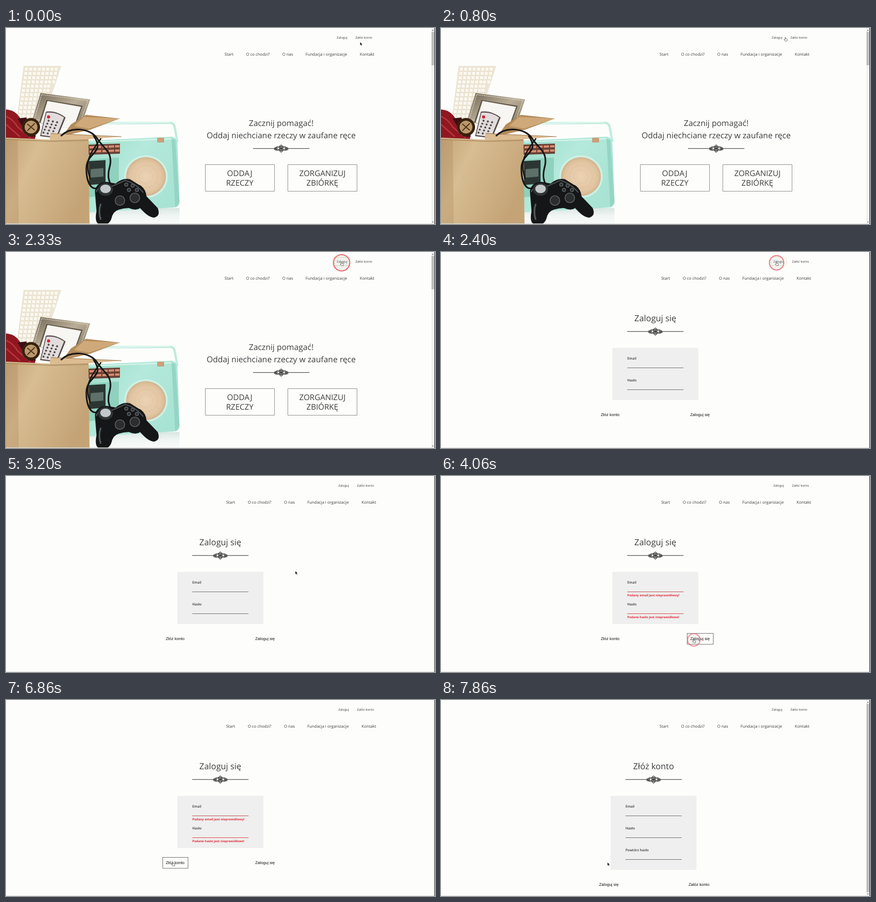
These frames come from a looping animation (806x368 px, 8 s). An HTML page:

```html
<!DOCTYPE html>
<html lang="pl">
<head>
<meta charset="utf-8">
<title>Oddaj rzeczy</title>
<style>
html, body { margin: 0; width: 100%; height: 100%; overflow: hidden; background: #fdfefc; }
svg { display: block; width: 806px; height: 368px; }
text { font-family: "Open Sans", sans-serif; fill: #3c3c3c; text-rendering: geometricPrecision; }
.btn { font-family: "Liberation Sans", Arial, sans-serif; fill: #111; }
.mid { text-anchor: middle; }
.label { font-weight: 600; fill: #333; }
.error { font-weight: 700; fill: #e0303f; }
</style>
</head>
<body>
<svg viewBox="0 0 806 368">
  <defs>
    <linearGradient id="card" x2="1" y2="0.5">
      <stop offset="0" stop-color="#c3a478"/><stop offset=".35" stop-color="#d8bd92"/><stop offset="1" stop-color="#c4a477"/>
    </linearGradient>
    <linearGradient id="mint" x2="1" y2=".6">
      <stop offset="0" stop-color="#9cdcca"/><stop offset=".5" stop-color="#b4e9db"/><stop offset="1" stop-color="#a9e3d3"/>
    </linearGradient>
    <linearGradient id="floor" x2="0" y2="1">
      <stop offset="0" stop-color="#d9e6e2"/><stop offset=".5" stop-color="#f1f6f4"/><stop offset="1" stop-color="#f8faf9"/>
    </linearGradient>
    <linearGradient id="silver" x2="1" y2="1">
      <stop offset="0" stop-color="#6e6453"/><stop offset=".5" stop-color="#b9ad97"/><stop offset="1" stop-color="#7d715b"/>
    </linearGradient>
    <radialGradient id="cone">
      <stop offset="0" stop-color="#ecd2b3"/><stop offset=".8" stop-color="#e2c5a2"/><stop offset="1" stop-color="#d2b38c"/>
    </radialGradient>
    <g id="curl" fill="none" stroke="#333" stroke-width="1.100">
      <path d="M0-7L4-3.500L0-.5M0 7L4 3.200L0 .4M1-3.500h1.400M1 3.400h1.600M53 0H9"/>
      <path d="M3 0C5-5 10-4 8.500-1.200C7.500 0 5.800-1.500 7-2.200M3 0C5 5 10 4 8.500 1.200C7.500 0 5.800 1.500 7 2.200"/>
      <path d="M8 2C11 4 14 1.500 12.500 .2M8-2C11-3 13-1.500 12 0"/>
      <path d="M0-5L2-3.500L0-2ZM0 5L2 3.500L0 2ZM0-1.500L4 0L0 1.500ZM9-1.500L13 .5L9 2.500Z" fill="#333" stroke="none"/>
    </g>
    <g id="ornament"><use href="#curl"/><use href="#curl" transform="scale(-1 1)"/></g>
  </defs>
  <rect width="806" height="368" fill="#fdfefc"/>

  <g id="landing">
    <g id="photo">
      <path d="M33 71H104L84 132L66 172H20Z" fill="#eee6d5"/>
      <g id="keys" fill="#fbf8f0" stroke="#dcd1bb" stroke-width=".5"/>
      <path d="M65 122L158 134L140 186L48 176Z" fill="url(#silver)"/>
      <path d="M67 125L154 136L138 180L53 172Z" fill="none" stroke="#e0d7c4" stroke-width="1.500" stroke-dasharray="2 1.500"/>
      <path d="M76 135L144 146L128 190L62 178Z" fill="#62584a"/>
      <path d="M78 137L141 148L126 190L65 178Z" fill="#f8f6f2"/>
      <path d="M157 338H326V368H157Z" fill="url(#floor)"/>
      <path d="M160 186Q168 179 180 179L308 178Q315 178 317 186L322 214" fill="none" stroke="#c2ecdf" stroke-width="4.500"/>
      <path d="M170 180L308 176.500" stroke="#e6f7f2" stroke-width="2"/>
      <path d="M150 212L312 204Q321 206 322 216L326 326Q326 336 316 337L157 346Z" fill="url(#mint)"/>
      <path d="M318 210L326 328L318 337L311 208Z" fill="#94d5c3"/>
      <path d="M157 214L310 208" stroke="#d9f5ec" stroke-width="2"/>
      <path d="M284 206h13v9h-13Z" fill="#c99f7a"/>
      <path d="M155 219L214 217V236L155 238Z" fill="#6b4136"/>
      <path d="M157 224L213 222M157 232L213 230" stroke="#d98d72" stroke-width="4" stroke-dasharray="10 2"/>
      <path d="M155 247L212 243V312L155 318Z" fill="#8fd1be"/>
      <path d="M155 250L187 248V292L155 295Z" fill="#2b3633"/>
      <path d="M159 265L183 263V279L159 281Z" fill="#5d7069"/>
      <ellipse cx="263" cy="279" rx="41" ry="40" fill="#cdf1e6"/>
      <ellipse cx="263" cy="279" rx="37.500" ry="36.500" fill="url(#cone)"/>
      <g fill="none" stroke="#d3b48e" stroke-width="1" stroke-dasharray="1 2">
        <circle cx="263" cy="279" r="29"/><circle cx="263" cy="279" r="21"/><circle cx="263" cy="279" r="13"/>
      </g>
      <path d="M122 181L150 163L214 170L158 191L106 203Z" fill="#b48c5c"/>
      <path d="M146 167L214 170L156 189L128 184Z" fill="#cfa97a"/>
      <path d="M0 153Q18 154 27 170L56 198L54 212H0Z" fill="#8f1720"/>
      <path d="M0 166Q14 172 22 186L46 206M0 181L26 204" fill="none" stroke="#b9343d" stroke-width="2.500"/>
      <path d="M22 170L38 168L56 204H42Z" fill="#3a1013"/>
      <circle cx="47" cy="186" r="17" fill="#38210f"/>
      <circle cx="47" cy="186" r="12" fill="#bb996c"/>
      <path d="M40 193L54 179M40 180L54 192" stroke="#55371c" stroke-width="2"/>
      <path d="M75 157Q94 154 112 168L96 207L64 203Z" fill="#55484a"/>
      <path d="M76 159Q94 157 109 168L94 205L66 201Z" fill="#e2dcdc"/>
      <g id="pads" fill="#514b50"/>
      <circle cx="80" cy="167" r="3" fill="#cf2733"/>
      <path d="M0 207L82 211L155 209L157 368H0Z" fill="url(#card)"/>
      <path d="M0 207L22 209L24 368H0Z" fill="#a88659" opacity=".3"/>
      <path d="M0 205L85 210L155 207V212L85 214L0 210Z" fill="#9d784b" opacity=".45"/>
      <path d="M84 198L217 204L154 209L82 210Z" fill="#dcbc90"/>
      <path d="M84 198L217 204" stroke="#9b774b" stroke-width="1"/>
      <path d="M0 207L84 210" stroke="#e6cba3" stroke-width="1.500"/>
      <g fill="none" stroke="#161616" stroke-width="3" stroke-linecap="round">
        <path d="M104 202C122 184 158 188 171 207C184 228 203 232 194 264Q190 280 196 292"/>
        <path d="M165 203C187 236 151 232 151 264C151 294 163 308 176 298"/>
        <path d="M178 208C160 232 146 250 158 282" stroke-width="2.500"/>
      </g>
      <path d="M167 306Q171 288 190 289L206 292Q219 281 233 284L249 294Q262 299 264 316L285 338Q291 352 279 356Q267 356 252 338Q244 344 231 338Q222 338 212 341Q201 344 198 358Q195 368 186 368H174Q166 364 170 344Z" fill="#151617"/>
      <path d="M169 308Q178 291 200 297L224 286Q243 291 258 309" fill="none" stroke="#4d5153" stroke-width="2"/>
      <ellipse cx="187" cy="303" rx="14" ry="12" fill="#303435"/>
      <ellipse cx="187" cy="302" rx="10" ry="8" fill="#c3c8c8"/>
      <path d="M178 330Q173 345 178 360" fill="none" stroke="#565a5c" stroke-width="3"/>
      <g fill="#2b2e30" stroke="#5c6163" stroke-width="1.500">
        <circle cx="214" cy="324" r="9"/><circle cx="242" cy="319" r="9"/>
        <circle cx="226" cy="294" r="3"/><circle cx="238" cy="296" r="3"/><circle cx="231" cy="304" r="3"/><circle cx="246" cy="304" r="3"/>
      </g>
    </g>
    <use href="#ornament" x="517" y="226.300"/>
    <path d="M374.500 256.500h130v50h-130ZM529.500 256.500h130v50h-130Z" fill="none" stroke="#959595"/>
  </g>

  <g id="login"></g>
  <g id="register"></g>
  <g id="header"></g>
  <rect id="hover" fill="none"/>

  <g id="scroll">
    <path d="M799 0h6v368h-6Z" fill="#f1f1f1"/>
    <path d="M800.500 5l1.500-2 1.500 2ZM800.500 363.500l1.500 2 1.500-2Z" fill="#555"/>
    <rect id="thumb" x="799.500" y="7" width="5" fill="#bcbcbc"/>
  </g>
  <path d="M0 367.500H805" stroke="#e3e4e2"/>
  <path d="M805.500 0V368" stroke="#222"/>

  <circle id="ring" fill="#999" fill-opacity=".12" stroke="#e8696f" stroke-width="2"/>
  <g id="cursor">
    <path id="arrow" transform="translate(-.7 .4) scale(.88)" d="M0 0V7L1.700 5.500L2.900 8.200L4 7.700L2.800 5H5Z" fill="#111" stroke="#fff" stroke-width=".3"/>
    <path id="hand" transform="scale(.88)" d="M-.8 .6Q0-.5 .9 .6V3.200L3.600 3.800Q4.400 4 4.200 5.200L3.600 8H-.6L-2.800 5.200Q-3 4-.8 5Z" fill="#fff" stroke="#444" stroke-width=".8"/>
    <path id="beam" d="M-1.200-3.500h2.400M0-3.500v7M-1.200 3.500h2.400" fill="none" stroke="#777" stroke-width=".8"/>
  </g>
</svg>
<script>
const $ = id => document.getElementById(id);
const add = (id, markup) => $(id).insertAdjacentHTML('beforeend', markup);
const show = (id, on) => $(id).style.display = on ? '' : 'none';
const text = (x, y, size, str, cls = '') =>
  `<text x="${x}" y="${y}" font-size="${size}" class="${cls}">${str}</text>`;
const line = (x, y, color = '#777') => `<path d="M${x} ${y}h105.5" stroke="${color}"/>`;

// Photo details
for (let r = 0; r < 12; r++) for (let c = 0; c < 8; c++) {
  const x = 35 + c * 8 - r * 1.15 - (c > 5 ? r * .4 : 0);
  if (x + 7 < 102 - r * 2.6) add('keys', `<rect x="${x}" y="${74 + r * 8}" width="6.8" height="6.6" rx="1"/>`);
}
for (let r = 0; r < 5; r++) for (let c = 0; c < 3; c++)
  add('pads', `<circle cx="${80 + c * 8 - r * 2.4}" cy="${174 + r * 5.6 + c * 1.5}" r="1.900"/>`);

// Pages
add('header', text(621.3, 20, 5.88, 'Zaloguj') + text(656.4, 20, 5.88, 'Załóż konto') +
  [[410.5, 'Start'], [451, 'O co chodzi?'], [519, 'O nas'], [562.8, 'Fundacja i organizacje'], [664.8, 'Kontakt']]
    .map(([x, s]) => text(x, 51.7, 7.6, s)).join(''));

add('landing', text(517, 183.5, 15.2, 'Zacznij pomagać!', 'mid') +
  text(517, 207, 15.2, 'Oddaj niechciane rzeczy w zaufane ręce', 'mid') +
  [[439.2, 'ODDAJ', 'RZECZY'], [594.4, 'ZORGANIZUJ', 'ZBIÓRKĘ']]
    .map(([x, a, b]) => text(x, 278.3, 14.7, a, 'mid') + text(x, 296, 14.7, b, 'mid')).join(''));

function form(id, cx, title, labels, left, right) {
  const x = cx - 52.7, h = 16 + 41 * labels.length, y = 209.5 + h;
  add(id, text(cx, 130, 15.9, title, 'mid') + `<use href="#ornament" x="${cx}" y="149.300"/>` +
    `<rect x="${cx - 80.7}" y="180" width="161.400" height="${h}" fill="#eeefee"/>` +
    labels.map((s, i) => text(x, 201.6 + 41 * i, 6.4, s, 'label') + line(x, 217.5 + 41 * i)).join('') +
    text(cx - 102.5, y, 7.6, left, 'btn') + text(cx + 65.5, y, 7.6, right, 'btn'));
}
form('login', 402.7, 'Zaloguj się', ['Email', 'Hasło'], 'Złóż konto', 'Zaloguj się');
form('register', 399.4, 'Złóż konto', ['Email', 'Hasło', 'Powtórz hasło'], 'Zaloguj się', 'Załóż konto');
add('login', '<g id="errors">' +
  line(350, 217.5, '#c0585c') + text(350, 225.7, 5.85, 'Podany email jest nieprawidłowy!', 'error') +
  line(350, 258.5, '#e0505c') + text(350, 266.8, 5.85, 'Podane hasło jest nieprawidłowe!', 'error') + '</g>');

// Timing
const LOOP = 8000, STEP = 200 / 3;
const clicks = [2333, 3933, 7133];
const track = [
  [0, 666, 26], [333, 663, 18], [533, 663, 18], [1066, 631, 17], [1133, 631, 17], [1466, 653, 18],
  [1800, 630.5, 18.5], [2733, 630.5, 18.5], [3600, 476, 304.5], [3666, 476, 305], [3733, 475, 306],
  [4333, 475, 306], [5133, 414, 262], [5200, 414, 262], [5400, 433, 210], [5900, 433, 210],
  [6733, 313.5, 304.5], [8000, 313.5, 304.5]
];

function place(t) {
  const i = Math.max(1, track.findIndex(k => k[0] > t));
  const [t0, x0, y0] = track[i - 1], [t1, x1, y1] = track[i];
  const p = (t - t0) / (t1 - t0), e = p * p * (3 - 2 * p);
  return [x0 + (x1 - x0) * e, y0 + (y1 - y0) * e];
}

const inside = (x, y, [l, t, r, b]) => x >= l && x <= r && y >= t && y <= b;

function draw(time) {
  const t = Math.min(Math.floor((time + 6.8) / STEP) * STEP, LOOP - STEP);
  const page = t < 2390 ? 'landing' : t < 7190 ? 'login' : 'register';
  const wide = page === 'login', dx = wide ? 3.2 : 0;
  for (const id of ['landing', 'login', 'register']) show(id, id === page);
  show('errors', t > 3990);
  show('scroll', !wide);
  $('thumb').setAttribute('height', page === 'landing' ? 63 : 354);
  $('header').setAttribute('transform', `translate(${dx} 0)`);

  const [x, y] = place(t);
  const links = [[616.5 + dx, 10, 646 + dx, 25.5], [652 + dx, 10, 693 + dx, 25.5]];
  const buttons = wide ? [[294.5, 295.5, 342, 316], [462.5, 295.5, 511.5, 316]] : [];
  const box = [...links, ...buttons].find(b => inside(x, y, b));
  show('hover', box);
  if (box) {
    const [l, top, r, b] = box, h = $('hover');
    for (const [k, v] of Object.entries({ x: l, y: top, width: r - l, height: b - top })) h.setAttribute(k, v);
    h.setAttribute('stroke', y > 100 ? '#777' : wide ? '#f3ead2' : '#d9dcae');
  }

  const hand = box || inside(x, y, [616, 10, 694, 25.5]) || page === 'register' && t < 7860;
  const beam = !hand && wide && inside(x, y, [350, 195, 455, 268]);
  show('hand', hand);
  show('beam', beam);
  show('arrow', !hand && !beam);
  $('cursor').setAttribute('transform', `translate(${x} ${y})`);

  const k = clicks.map(c => (t - c) / STEP).find(n => n > -.1 && n < 4.9);
  show('ring', k !== undefined);
  if (k !== undefined) {
    const ring = $('ring');
    ring.setAttribute('cx', x);
    ring.setAttribute('cy', y + 1.7);
    ring.setAttribute('r', 15.3 - 1.8 * k);
    ring.setAttribute('opacity', 1 - .15 * k);
  }
}

const start = performance.now();
function tick() {
  draw((performance.now() - start) % LOOP);
  requestAnimationFrame(tick);
}
tick();
</script>
</body>
</html>
```
